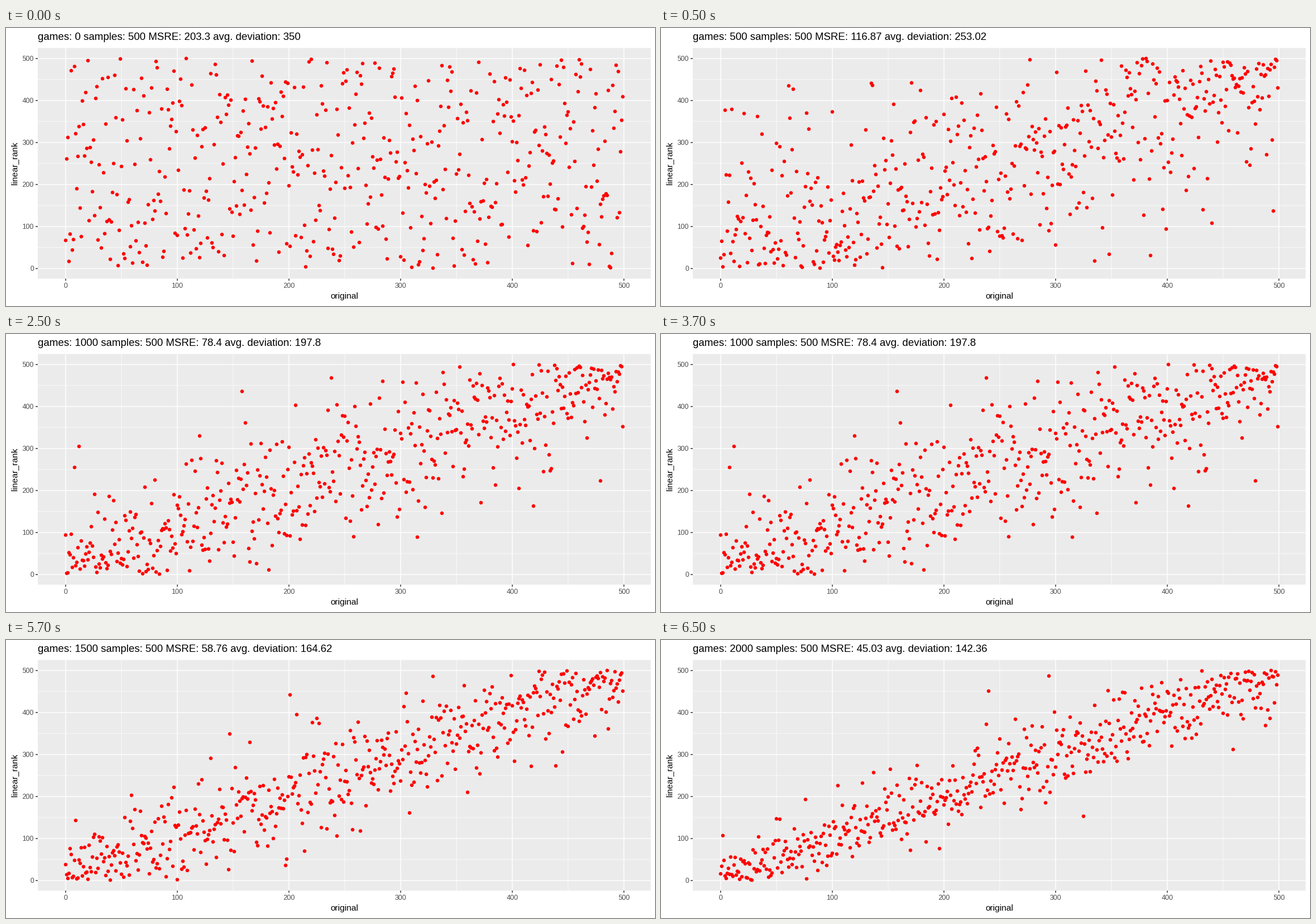
Write a matplotlib script that moves like this. It is 1143 px wide and 490 px high and loops after 8000 ms.

```python
import numpy as np
import matplotlib.pyplot as plt
from matplotlib.animation import FuncAnimation

W, H, DPI = 1143, 490, 100
N = 500
LEFT, RIGHT, TOP, BOTTOM = 56.0, 1135.4, 35.3, 441.7
PAD = 0.05 * (N - 1)
SPAN = N - 1 + 2 * PAD
LINE, TICK = 1.07, 2.75 * DPI / 72
DOT = 4.62
ERRORS = [203.3, 116.87, 78.4, 58.76, 45.03]
DEVIATIONS = [350, 253.02, 197.8, 164.62, 142.36]


def px(x):
    return LEFT + (x + PAD) * (RIGHT - LEFT) / SPAN


def py(y):
    return BOTTOM - (y - 1 + PAD) * (BOTTOM - TOP) / SPAN


def noisy_ranks(rng, error):
    """Rank the samples with just enough noise to reach the given error."""
    index = np.arange(N)
    noise = rng.logistic(size=N)
    lo, hi = 0, 1e4
    for _ in range(40):
        spread = (lo + hi) / 2
        ranks = np.argsort(np.argsort(index + spread * noise))
        if np.sqrt(np.mean((ranks - index) ** 2)) < error:
            lo = spread
        else:
            hi = spread
    return ranks + 1


rng = np.random.default_rng(11)
points, titles = [], []
for k, (error, dev) in enumerate(zip(ERRORS, DEVIATIONS)):
    points.append(np.column_stack([px(np.arange(N)), py(noisy_ranks(rng, error))]))
    titles.append(f"games: {500 * k} samples: {N} MSRE: {error} avg. deviation: {dev}")

plt.rcParams["font.family"] = "Liberation Sans"
fig = plt.figure(figsize=(W / DPI, H / DPI), dpi=DPI, facecolor="white")
ax = fig.add_axes([0, 0, 1, 1])
ax.set(xlim=(0, W), ylim=(H, 0))
ax.axis("off")


def line(xs, ys, color, width):
    ax.plot(xs, ys, color=color, lw=width, solid_capstyle="butt", snap=False)


def label(x, y, text, size, color="black", ha="center", rotation=0):
    return ax.text(x, y, text, size=size, color=color, ha=ha, va="baseline",
                   rotation=rotation, rotation_mode="anchor")


ax.add_patch(plt.Rectangle((LEFT, TOP), RIGHT - LEFT, BOTTOM - TOP,
                           fc="#EBEBEB", lw=0, snap=False))

# minor grid first, then major
for start, width in ((50, LINE / 2), (0, LINE)):
    for v in range(start, N + 1, 100):
        line([LEFT, RIGHT], [py(v)] * 2, "white", width)
        line([px(v)] * 2, [TOP, BOTTOM], "white", width)

for v in range(0, N + 1, 100):
    line([LEFT - TICK, LEFT], [py(v)] * 2, "#333333", LINE)
    line([px(v)] * 2, [BOTTOM, BOTTOM + TICK], "#333333", LINE)
    label(49, py(v) + 4.3, str(v), 8.8, "#4D4D4D", ha="right")
    label(px(v), 458, str(v), 8.8, "#4D4D4D")

label((LEFT + RIGHT) / 2, 477, "original", 11)
label(18.7, (TOP + BOTTOM) / 2, "linear_rank", 11, rotation=90)
title = label(LEFT, 21, titles[0], 13.25, ha="left")
dots = ax.scatter(*points[0].T, s=np.full(N, DOT ** 2), c="red",
                  linewidths=0, zorder=3)


def update(i):
    # the first stage lasts one step, the later ones four
    k = (i + 3) // 4
    dots.set_offsets(points[k])
    title.set_text(titles[k])
    return dots, title


anim = FuncAnimation(fig, update, frames=16, interval=500,
                     repeat=True, repeat_delay=0)
plt.show()
```
